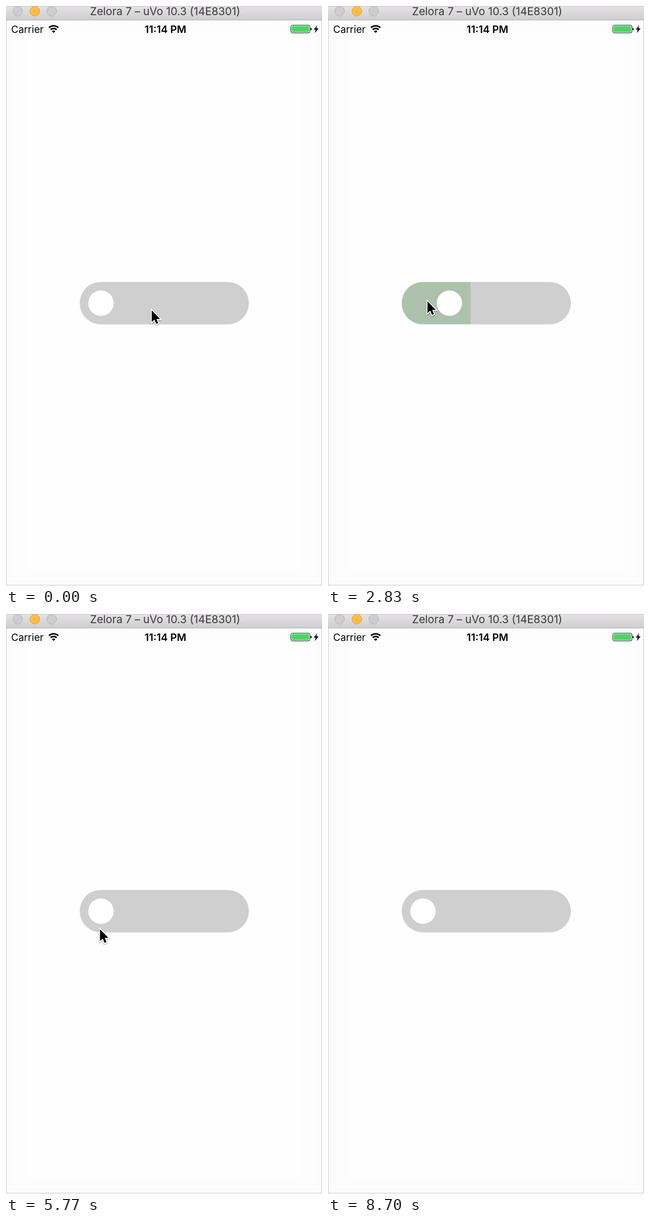
These frames come from a looping animation (553x1012 px, 8760 ms). An HTML page:

```html
<!DOCTYPE html>
<html lang="en">
<head>
<meta charset="utf-8">
<title>Cabin switch</title>
<style>
  html, body { margin: 0; width: 100%; height: 100%; overflow: hidden; background: #fefefe; }
  svg { display: block; width: 553px; height: 1012px; font-family: Inter, Roboto, sans-serif; }
</style>
</head>
<body>
<svg viewBox="0 0 553 1012">
  <defs>
    <linearGradient id="bar" x2="0" y2="1">
      <stop stop-color="#e4e2e4"/><stop offset="1" stop-color="#cfcdcf"/>
    </linearGradient>
    <clipPath id="pillClip"><rect class="pill" x="129" width="296" rx="37"/></clipPath>
    <filter id="shadow" x="-50%" y="-50%" width="200%" height="200%">
      <feDropShadow dx="0" dy="1.5" stdDeviation="1.2" flood-opacity=".35"/>
    </filter>
  </defs>

  <rect width="553" height="1012" fill="#fcfcfc"/>
  <rect x="12" y="46" width="529" height="954" rx="12" fill="#fdfdfd"/>
  <rect x="37" y="46" width="480" height="942" rx="12" fill="#fefefe"/>
  <path d="M.5 24V1010.5H552.5V24" fill="none" stroke="#cdcdcd"/>

  <rect width="553" height="25" fill="url(#bar)"/>
  <path d="M0 .5H553" stroke="#c9c7c9"/>
  <path d="M0 24.5H553" stroke="#b4b2b4"/>
  <g fill="#cecccf" stroke="#b9b7b9">
    <circle cx="20.5" cy="9" r="8.5"/>
    <circle cx="50.5" cy="9" r="8.5" fill="#fdbd40" stroke="#e0a33a"/>
    <circle cx="80" cy="9" r="8.5"/>
  </g>
  <text x="410" y="16" font-size="19" fill="#3b393b" text-anchor="end">Zelora 7 – uVo 10.3 (14E8301)</text>

  <text x="9" y="46.5" font-size="17.4">Carrier</text>
  <text x="279" y="46.5" font-size="17.9" font-weight="600" text-anchor="middle">11:14 PM</text>
  <g fill="none" stroke="#000" stroke-width="2.6">
    <path d="M75.2 37.8A12 12 0 0 1 91.6 37.8"/>
    <path d="M78.2 41.2A7.6 7.6 0 0 1 88.6 41.2"/>
    <path d="M83.4 47L80.4 43.9A4.2 4.2 0 0 1 86.4 43.9Z" fill="#000" stroke="none"/>
  </g>
  <rect x="498.5" y="33.5" width="33.5" height="13.5" rx="3" fill="#fff" stroke="#222"/>
  <rect x="500" y="35" width="30.5" height="10.5" rx="1.5" fill="#4cd562"/>
  <path d="M533 38Q535 38.5 535 40.2T533 42.5Z"/>
  <path d="M544.5 33.5L538.5 41.2H542L540.6 47.2L547 39H543.2Z"/>

  <rect id="track" class="pill" x="129" width="296" rx="37"/>
  <g clip-path="url(#pillClip)">
    <rect id="band" x="129" width="296" height="74" fill="#289027"/>
    <g id="labels" fill="#fff" font-size="26" font-weight="600">
      <text x="158" y="48">Economy</text>
      <text x="158" y="122">Business</text>
    </g>
  </g>
  <circle id="knob" r="22.2" fill="#fff"/>

  <path id="cursor" d="M0 0V20.5L4.7 16.2L8 23.7L11.4 22.2L8.2 14.9H14.5Z"
    stroke="#fff" stroke-width="3" paint-order="stroke" filter="url(#shadow)"/>
</svg>
<script>
const LOOP = 8760, POINTER_GONE = 8100;
const MIDDLE = 518.5, ROW = 74, TRAVEL = 222, LABEL_TRAVEL = 278;
const GREY = [207, 207, 207], GREEN = [95, 172, 91];
const HOME = [159, 516], LOW = [165, 553];
const $ = id => document.getElementById(id);
const pills = document.querySelectorAll('.pill');

// A track is a list of { t, v } keys, eased from key to key.
const track = (...v) => [{ t: 0, v }];
const slide = track(0), expand = track(0), row = track(0), pointer = track(255, 531);

function move(keys, from, to, ...v) {
  keys.push({ t: from, v: keys[keys.length - 1].v }, { t: to, v });
}

// Swipe right: the knob crosses, then the pill unfolds onto its first row.
function open(t, point) {
  move(pointer, t - 20, t + 350, ...point);
  move(slide, t, t + 170, 1);
  move(expand, t + 110, t + 350, 1);
  move(row, t + 110, t + 350, -1);
}

// Swipe down: the second row is picked.
function pick(t, point) {
  move(pointer, t - 30, t + 300, ...point);
  move(row, t, t + 380, 1);
}

// Swipe left: the pill folds, then the knob returns.
function close(t, point) {
  move(pointer, t - 100, t + 130, ...point);
  move(row, t - 40, t + 150, 0);
  move(expand, t, t + 330, 0);
  move(slide, t + 140, t + 350, 0);
}

function wander(t) {
  move(pointer, t, t + 400, ...LOW);
  move(pointer, t + 450, t + 850, ...HOME);
}

wander(0);
open(950, [345.5, 503]);
close(1800, HOME);
open(2780, [320, 508]);
pick(3280, [314, 546]);
close(4800, [173.5, 537.5]);
wander(5250);
open(6150, [293.5, 505]);
close(7650, HOME);

const mix = (a, b, k) => a + (b - a) * k;

function sample(keys, t) {
  const i = keys.findIndex(key => key.t > t);
  if (i < 0) return keys[keys.length - 1].v;
  const a = keys[i - 1], b = keys[i];
  const u = (t - a.t) / (b.t - a.t);
  return a.v.map((v, n) => mix(v, b.v[n], u * u * (3 - 2 * u)));
}

const place = (id, x, y) => $(id).setAttribute('transform', `translate(${x} ${y})`);

function draw(t) {
  const [s] = sample(slide, t), [e] = sample(expand, t), [r] = sample(row, t);
  const height = ROW * (1 + e), top = MIDDLE - height / 2;
  const center = MIDDLE + r * ROW / 2, shift = -TRAVEL * (1 - s);

  for (const pill of pills) {
    pill.setAttribute('y', top);
    pill.setAttribute('height', height);
  }
  $('track').setAttribute('fill', `rgb(${GREY.map((v, i) => mix(v, GREEN[i], e))})`);
  $('band').setAttribute('opacity', s);
  place('band', shift, center - ROW / 2);
  place('labels', -LABEL_TRAVEL * (1 - e), top);
  place('knob', 388.2 + shift, center);
  place('cursor', ...sample(pointer, t));
  $('cursor').setAttribute('visibility', t < POINTER_GONE ? 'visible' : 'hidden');
}

let start;
function tick(now) {
  start ??= now;
  draw((now - start) % LOOP);
  requestAnimationFrame(tick);
}
draw(0);
requestAnimationFrame(tick);
</script>
</body>
</html>
```
